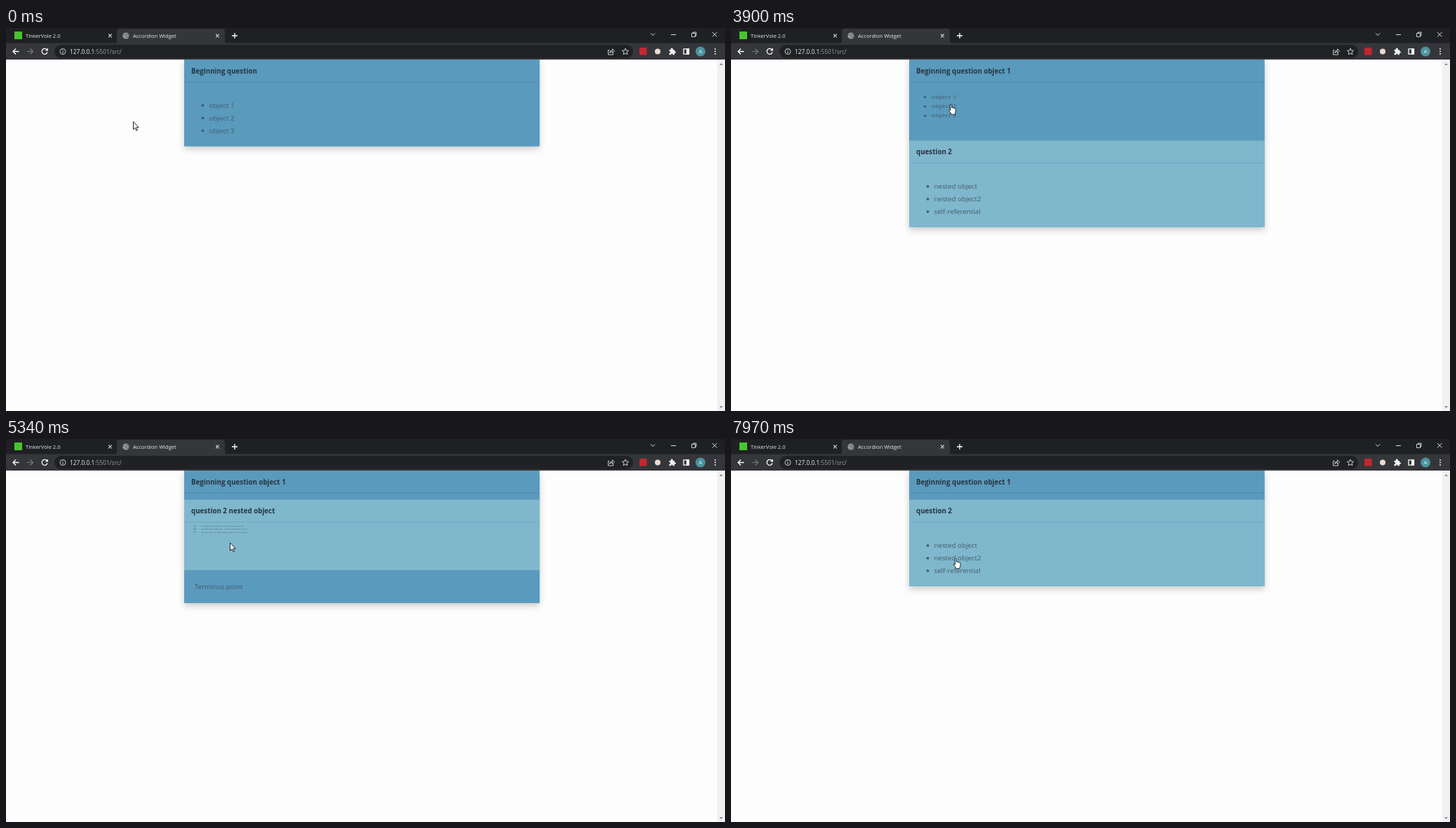
An HTML page for the animation above (8 s loop, 1025x546 px).

```html
<!DOCTYPE html>
<html lang="en">
<head>
<meta charset="utf-8">
<title>Accordion Widget</title>
<style>
  html, body { margin: 0; width: 100%; height: 100%; overflow: hidden; background: #fdfdfd; }
  svg { display: block; width: 1025px; height: 546px; }
  text { font-family: "Open Sans", "Noto Sans", sans-serif; font-size: 9.75px; white-space: pre; }
  .title { font-weight: 700; fill: #273540; }
  .body { fill: #455b69; }
  .tab { font-size: 7.55px; fill: #e6e7e9; }
  .url { font-size: 8.35px; fill: #9aa0a6; }
  .icon { fill: none; stroke: #dfe1e5; stroke-width: 1; }
  #shadow { filter: drop-shadow(0 4px 5px rgba(0, 0, 0, .2)); }
</style>
</head>
<body>
<svg viewBox="0 0 1025 546">
  <rect width="1025" height="546" fill="#fdfdfd"/>

  <!-- page -->
  <rect id="shadow" x="254" y="45" width="506.5" fill="#5a9abd"/>
  <g id="page"></g>

  <!-- scrollbar -->
  <rect x="1014" y="45" width="11" height="501" fill="#f1f1f1"/>
  <path d="M1017 53l2.5-3 2.5 3zM1017 539l2.5 3 2.5-3z" fill="#8b8b8b"/>

  <!-- tab strip -->
  <rect width="1025" height="22" fill="#1f2023"/>
  <path d="M154 22q4 0 4-4V5q0-4 4-4H308q4 0 4 4V18q0 4 4 4z" fill="#35363a"/>
  <rect x="12" y="5" width="11" height="11" fill="#49c42f"/>
  <text class="tab" x="28" y="13.6">TinkerVole 2.0</text>
  <circle cx="171" cy="11" r="4.6" fill="#9da1a6"/>
  <path d="M167.5 9.5l3 1 1 2-2 2M171 7l1 2 3 .5M173 14l.5-2 2-.5" fill="none" stroke="#4a4c50"/>
  <text class="tab" x="181" y="13.6">Accordion Widget</text>
  <g class="icon">
    <path d="M146.2 8.7l4.6 4.6m0-4.6l-4.6 4.6M299.2 8.7l4.6 4.6m0-4.6l-4.6 4.6" stroke-width="1.2"/>
    <path d="M322 11h8M326 7v8" stroke="#fff" stroke-width="1.3"/>
    <path d="M919 7.5l3 3 3-3M948 9.5h7M1007 6l6.500 6.500m0-6.500l-6.500 6.500"/>
    <path d="M977.500 7.500h5v5h-5zM979.500 7.500v-1.500h4.500v5h-1.500" stroke-width=".9"/>
  </g>

  <!-- toolbar -->
  <rect y="21.500" width="1025" height="23.500" fill="#35363a"/>
  <rect x="69" y="24" width="825" height="19" rx="9.500" fill="#202124"/>
  <g class="icon">
    <path d="M18.500 33.500H10m4-4l-4 4 4 4" stroke="#fff" stroke-width="1.300"/>
    <path d="M30 33.500h8.500m-4-4l4 4-4 4" stroke="#77797d" stroke-width="1.200"/>
    <path d="M58.600 31.200A4 4 0 1 0 59 34.500M59.200 29v2.800h-2.800" stroke="#fff" stroke-width="1.300"/>
    <circle cx="81" cy="33.500" r="4" stroke-width=".9"/>
    <path d="M81 33v2.800M81 31v1"/>
    <path d="M860.500 31.500H858.500v6.500h7v-2M860.500 35.500q.5-3.500 4-3.500v-2.200l3 3-3 3v-2.200q-2.500 0-4 1.900z" stroke-width=".9"/>
    <path d="M883 29l1.300 3 3.200.3-2.400 2.200.7 3.200-2.800-1.700-2.800 1.700.7-3.200-2.400-2.200 3.200-.3z" stroke-width=".9"/>
    <path d="M966 29.800h7.500v7.400H966z" stroke="#fff" stroke-width="1.300"/>
  </g>
  <text class="url" x="91" y="36.600"><tspan fill="#f1f3f4">127.0.0.1</tspan>:5501/src/</text>
  <rect x="903" y="28" width="10.500" height="10.500" rx="1" fill="#c3272f"/>
  <circle cx="929" cy="33.500" r="4" fill="#eadbd3"/>
  <path d="M945.500 31h2.200q-.5-2.600 1.500-2.600t1.500 2.600h2.300v2.200q2-.3 2 1.300t-2 1.300v2.500h-2.300q0-1.700-1.300-1.700t-1.300 1.700h-2.600v-2.600q1.700 0 1.700-1.300t-1.700-1.300z" fill="#f1f3f4"/>
  <path d="M970 29.500h4v8h-4z" fill="#fff"/>
  <circle cx="990" cy="33.500" r="7" fill="#4b929f"/>
  <text x="990" y="36.400" text-anchor="middle" style="font-size:8px" fill="#e8f2f4">A</text>
  <g fill="#f1f3f4">
    <circle cx="1011" cy="30" r="1"/><circle cx="1011" cy="33.500" r="1"/><circle cx="1011" cy="37" r="1"/>
  </g>

  <!-- pointer -->
  <g id="pointer" fill="#fff" stroke="#111" stroke-width=".9" stroke-linejoin="round">
    <path id="arrow" d="M0 0V11.200L2.600 8.800 4.300 12.700 6 12 4.300 8.200H7.700z"/>
    <path id="hand" transform="translate(-3.700 0)" d="M2.700 9.200V1.400c0-1.500 2.100-1.500 2.100 0v4c.2-1 2-.9 2 .3.3-.7 1.800-.5 1.800.6.4-.5 1.600-.3 1.600.8v3.400c0 1-1 2.200-1 4.200H4.200C4 12.600 1 10.400.5 9c-.4-1.100 1-1.900 2.200.2z"/>
  </g>
</svg>

<script>
const LOOP = 8000, FOLD = 200;
const FIRST_CLICK = 3848, SECOND_CLICK = 5189, RESET_CLICK = 6690;
const LEFT = 254, TOP = 45, WIDTH = 506.5, HEADER = 32.5, PADDING = 15, ROW = 18;
const FOLDED = 41.5, TERMINUS = 46.5;

const byId = id => document.getElementById(id);
const clamp = v => Math.max(0, Math.min(1, v));
const show = (node, on) => node.setAttribute('visibility', on ? 'visible' : 'hidden');
const move = (node, x, y, extra = '') =>
  node.setAttribute('transform', `translate(${x} ${y}) ${extra}`);

function add(parent, tag, attrs, text = '') {
  const node = document.createElementNS('http://www.w3.org/2000/svg', tag);
  for (const key in attrs) node.setAttribute(key, attrs[key]);
  node.textContent = text;
  return parent.appendChild(node);
}

function makeSection(color, lineColor, items) {
  const group = add(byId('page'), 'g', {});
  const panel = add(group, 'rect', { width: WIDTH, fill: color });
  const title = add(group, 'text', { class: 'title', x: 10, y: 19.8 });
  add(group, 'rect', { y: HEADER - 1, width: WIDTH, height: 1, fill: lineColor });
  const list = add(group, 'g', { class: 'body' });
  const rows = add(list, 'g', {});
  items.forEach((item, i) => {
    const y = 21 + i * ROW;
    add(rows, 'circle', { cx: 11.5, cy: y - 3.2, r: 1.9 });
    add(rows, 'text', { x: 20.5, y }, item);
  });

  // Padding and vertical scale fold together; the emptied list is then removed.
  return function place(top, scale, label) {
    const height = scale > 0 ? 93.5 + 2 * PADDING * scale : FOLDED;
    move(group, LEFT, top);
    panel.setAttribute('height', height);
    title.textContent = label;
    list.setAttribute('display', scale > 0 ? 'inline' : 'none');
    move(list, 0, HEADER, `scale(1 ${scale})`);
    move(rows, PADDING * scale, PADDING * scale);
    return top + height;
  };
}

const placeFirst = makeSection('#5a9abd', '#5189b0', ['object 1', 'object 2', 'object 3']);
const secondLayer = add(byId('page'), 'g', {});
const placeSecond = makeSection('#7fb7cc', '#70a8c3', ['nested object', 'nested object2', 'self-referential']);
secondLayer.append(byId('page').lastChild);
const terminus = add(byId('page'), 'g', {});
add(terminus, 'rect', { width: WIDTH, height: TERMINUS, fill: '#5a9abd' });
add(terminus, 'text', { class: 'body', x: 15, y: 26.7 }, 'Terminus point');

// Pointer hot spot: time, x, y
const path = [
  [0, 181.5, 133.5], [360, 181.5, 133.5], [530, 203, 140], [830, 203, 140], [1000, 207.5, 141.3],
  [3700, 207.5, 141.3], [3830, 313.7, 108.5], [3920, 313.7, 108.5], [4070, 318.3, 138.5],
  [5040, 318.3, 138.5], [5150, 319.5, 148], [5940, 319.5, 148], [6100, 336.5, 111],
  [6740, 336.5, 111], [6900, 320.5, 168], [7940, 320.5, 168], [7970, 320.5, 170], [LOOP, 320.5, 170]
];
const handTimes = [[3800, 3960], [6050, 6790], [6880, LOOP]];

function drawPointer(t) {
  const next = path.findIndex(key => key[0] > t);
  const [t0, x0, y0] = path[next - 1], [t1, x1, y1] = path[next];
  const p = (t - t0) / (t1 - t0);
  move(byId('pointer'), x0 + (x1 - x0) * p, y0 + (y1 - y0) * p);
  const isHand = handTimes.some(([from, to]) => t >= from && t < to);
  show(byId('hand'), isHand);
  show(byId('arrow'), !isHand);
}

function draw(t) {
  const folded = start => clamp((t - start) / FOLD);
  const hasSecond = t >= FIRST_CLICK;
  const hasTerminus = t >= SECOND_CLICK && t < RESET_CLICK;
  const secondScale = t < RESET_CLICK ? 1 - folded(SECOND_CLICK) : Math.max(.001, folded(RESET_CLICK));

  let bottom = placeFirst(TOP, 1 - folded(FIRST_CLICK), 'Beginning question' + (hasSecond ? ' object 1' : ''));
  show(secondLayer, hasSecond);
  show(terminus, hasTerminus);
  if (hasSecond) bottom = placeSecond(bottom, secondScale, 'question 2' + (hasTerminus ? ' nested object' : ''));
  if (hasTerminus) {
    move(terminus, LEFT, bottom);
    bottom += TERMINUS;
  }
  byId('shadow').setAttribute('height', bottom - TOP);
  drawPointer(t);
}

const startTime = performance.now();
function tick() {
  draw((performance.now() - startTime) % LOOP);
  requestAnimationFrame(tick);
}
tick();
</script>
</body>
</html>
```
